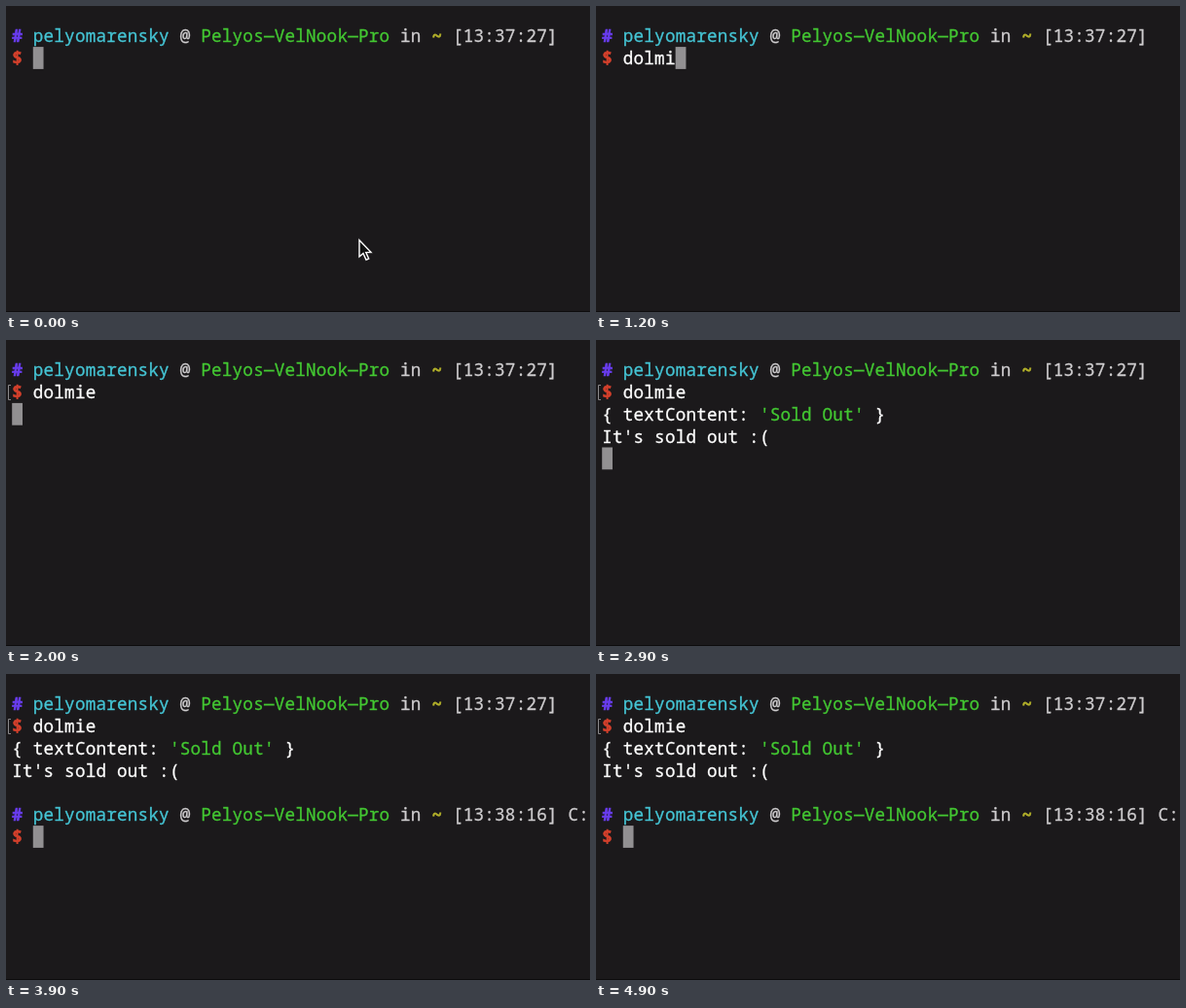
Recreate the animation shown at these times as an HTML page with a canvas. Size 600 by 315 pixels, loop 5000 ms.

```html
<!DOCTYPE html>
<html lang="en">
<head>
<meta charset="utf-8">
<title>Terminal</title>
<style>
  html, body { margin: 0; height: 100%; overflow: hidden; background: #1b191b; }
  canvas { display: block; }
</style>
</head>
<body>
<canvas id="stage" width="600" height="315"></canvas>
<script>
const ctx = document.getElementById('stage').getContext('2d');
const LOOP = 5000, LEFT = 6.2, TOP = 19.3, COL = 10.78, ROW = 22.8;
const C = {
  bg: '#1b191b', edge: '#0d0c0d', block: '#929092', white: '#ffffff', grey: '#cfcdcf',
  purple: '#6a3df0', cyan: '#45c5d5', green: '#43c832', yellow: '#b5b32a', red: '#d4402c'
};
const COMMAND = 'dolmie';
const KEYS = [400, 700, 800, 1000, 1100, 1300];
const ENTER = 1600, OUTPUT = 2800, DONE = 3100;

// Writes text on the character grid and returns the next free column.
function write(row, col, text, color, bold) {
  ctx.font = `${bold ? 'bold ' : ''}17.6px "Noto Sans Mono", "DejaVu Sans Mono", monospace`;
  ctx.fillStyle = ctx.strokeStyle = color;
  ctx.lineWidth = bold ? 0.7 : 0.3;
  for (const ch of text) {
    const x = LEFT + COL * col++, y = TOP + ROW * row + 17.8;
    ctx.fillText(ch, x, y);
    ctx.strokeText(ch, x, y);
  }
  return col;
}

function writeParts(row, parts) {
  let col = 0;
  for (const [text, color, bold] of parts) col = write(row, col, text, color, bold);
}

function prompt(row, tail) {
  writeParts(row, [
    ['# ', C.purple, true], ['pelyomarensky', C.cyan], [' @ ', C.grey],
    ['Pelyos—VelNook—Pro', C.green], [' in ', C.grey], ['~ ', C.yellow, true], [tail, C.grey]
  ]);
  write(row + 1, 0, '$', C.red, true);
}

function block(row, col) {
  ctx.fillStyle = C.block;
  ctx.fillRect(LEFT + COL * col, TOP + ROW * row, COL, ROW);
}

function pointer() {
  ctx.fillStyle = '#111';
  ctx.strokeStyle = '#fff';
  ctx.lineWidth = 1.4;
  const arrow = new Path2D('M363 241V258L367 254.6L370 261.4L372.7 260.2L369.8 253.6H375Z');
  ctx.fill(arrow);
  ctx.stroke(arrow);
}

function promptMark() {
  ctx.strokeStyle = '#8b898b';
  ctx.lineWidth = 1;
  ctx.stroke(new Path2D('M5 46.5H2.5V61.5H5'));
}

function draw(t) {
  ctx.fillStyle = C.bg;
  ctx.fillRect(0, 0, 600, 315);
  ctx.fillStyle = C.edge;
  ctx.fillRect(0, 314, 600, 1);

  prompt(0, '[13:37:27]');
  const typed = KEYS.filter(k => t >= k).length;
  write(1, 2, COMMAND.slice(0, typed), C.white);
  if (!typed) pointer();
  if (t >= ENTER) promptMark();
  if (t >= OUTPUT) {
    writeParts(2, [['{ textContent: ', C.white], ["'Sold Out'", C.green], [' }', C.white]]);
    write(3, 0, "It's sold out :(", C.white);
  }
  if (t >= DONE) prompt(5, '[13:38:16] C:');

  if (t < ENTER) block(1, 2 + typed);
  else if (t < OUTPUT) block(2, 0);
  else if (t < DONE) block(4, 0);
  else block(6, 2);
}

const start = performance.now();
function frame() {
  draw((performance.now() - start) % LOOP);
  requestAnimationFrame(frame);
}
frame();
</script>
</body>
</html>
```
